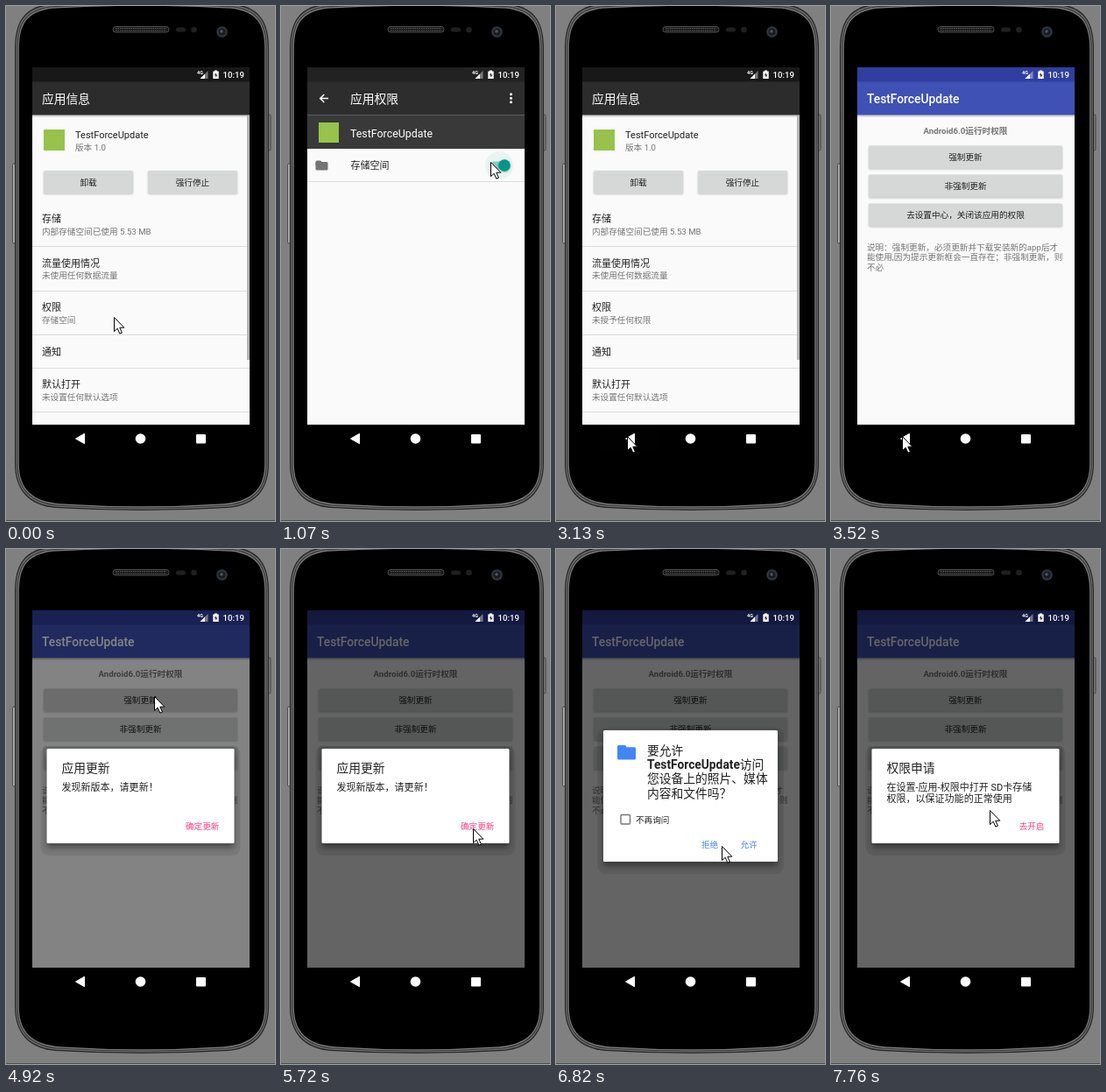
Animation, 307 px wide and 588 px high, one loop 8 s. Source, as an HTML page:

```html
<!DOCTYPE html>
<html lang="zh-CN">
<head>
<meta charset="utf-8">
<title>App permissions</title>
<style>
html, body { margin: 0; width: 100%; height: 100%; overflow: hidden; background: #808080; }
svg { display: block; width: 307px; height: 588px; }
text { font-family: Roboto, "Noto Sans CJK SC", "Noto Sans CJK", sans-serif; white-space: pre; }
</style>
</head>
<body>
<svg id="stage" viewBox="0 0 307 588" xmlns="http://www.w3.org/2000/svg"></svg>
<script>
const LOOP = 8000;
const DP = 248 / 360;                       // screen pixels per Android dp
const SMALL = 14 * DP, BODY = 16 * DP, LARGE = 18 * DP, TITLE = 20 * DP;
const INK = '#212121', GREY = '#757575', PINK = '#ff4081', BLUE = '#4285f4', LEAF = '#97c24c';
const APP = 'TestForceUpdate';
const MID = 'text-anchor="middle"', END = 'text-anchor="end"', MEDIUM = 'font-weight="500"';

// Shape helpers; text is placed by its vertical centre.
const rect = (x, y, w, h, fill, more = '') =>
  `<rect x="${x}" y="${y}" width="${w}" height="${h}" fill="${fill}" ${more}/>`;
const dot = (x, y, r, fill, more = '') =>
  `<circle cx="${x}" cy="${y}" r="${r}" fill="${fill}" ${more}/>`;
const path = (d, fill, more = '') => `<path d="${d}" fill="${fill}" ${more}/>`;
const text = (x, y, size, fill, str, more = '') =>
  `<text x="${x}" y="${y + size * 0.37}" font-size="${size}" fill="${fill}" ${more}>${str}</text>`;
const group = (id, body, more = '') => `<g id="${id}" ${more}>${body}</g>`;
const lines = (x, y, step, size, fill, list) =>
  list.map((s, i) => text(x, y + i * step, size, fill, s)).join('');
const cover = (fill, more) => rect(30, 70, 248, 408, fill, more);

const button = (x, y, w, label) =>
  rect(x, y + 1, w, 26, '#000', 'rx="1.5" opacity=".22" filter="url(#soft)"') +
  rect(x, y, w, 26, '#d6d7d7', 'rx="1.5"') +
  text(x + w / 2, y + 13, SMALL, INK, label, MID + ' ' + MEDIUM);

const page = (statusColor, barColor) =>
  cover('#fafafa') + rect(30, 124.5, 248, 3, 'url(#drop)') +
  rect(30, 86, 248, 38.5, barColor) + rect(30, 70, 248, 16.5, statusColor);

const folder = (x, y, w, h, fill) =>
  rect(x, y, w * 0.48, h / 2, fill, 'rx="1.5"') +
  rect(x, y + h * 0.14, w, h * 0.86, fill, 'rx="1.5"');

const panel = (x, y, w, h) =>
  rect(x - 7, y - 3, w + 14, h + 17, '#000', 'rx="9" opacity=".08"') +
  rect(x, y + 5, w, h, '#000', 'rx="3" opacity=".36" filter="url(#blur)"') +
  rect(x, y, w, h, '#fff', 'rx="1.5"');

function infoPage() {
  const items = [['存储', '内部存储空间已使用 5.53 MB'], ['流量使用情况', '未使用任何数据流量'],
    ['权限', '存储空间'], ['通知'], ['默认打开', '未设置任何默认选项']];
  let y = 243, list = '';
  for (const [head, sub] of items) {
    list += text(41, y, BODY, INK, head);
    if (sub) list += text(41, y + 14, SMALL, GREY, sub, head === '权限' ? 'id="permSub"' : '');
    y += sub ? 50.5 : 37.5;
    list += rect(30, Math.round(y - 19.5), 248, 1, '#dcdcdc');
  }
  return page('#181818', '#2c2c2c') +
    text(41, 105.5, TITLE, '#fff', '应用信息') +
    rect(43, 141, 24, 24, LEAF) +
    text(79, 147, BODY, INK, APP) + text(79, 161, SMALL, GREY, '版本 1.0') +
    button(43, 188, 102, '卸载') + button(162, 188, 102, '强行停止') +
    rect(30, 325, 248, 50, '#000', 'id="rowPress"') + list +
    rect(275, 125, 3, 279, '#b4b4b4');
}

function permPage() {
  return page('#222', '#2d2d2d') + rect(30, 124.5, 248, 38.5, '#393939') +
    path('M54 105.5H45M49.3 101l-4.6 4.5 4.6 4.5', 'none', 'stroke="#fff" stroke-width="1.5"') +
    text(79, 106, TITLE, '#fff', '应用权限') +
    [-1, 0, 1].map(i => dot(262.5, 105.3 + i * 4.5, 1.5, '#fff')).join('') +
    rect(43, 133, 23, 23, LEAF) + text(79, 145, LARGE, '#fff', APP) +
    folder(39.5, 176.5, 14, 11, GREY) + text(79.5, 182.3, BODY, INK, '存储空间') +
    rect(30, 200, 248, 1, '#dcdcdc') +
    dot(249, 182, 16, '#009688', 'id="halo"') +
    rect(239, 177.5, 20.5, 9, '#b9b9b9', 'id="track" rx="4.5"') +
    group('thumb', dot(0, 0.8, 7, '#000', 'opacity=".25" filter="url(#soft)"') +
      dot(0, 0, 6.8, '#ececec', 'id="knob"'));
}

function mainPage() {
  const labels = ['强制更新', '非强制更新', '去设置中心，关闭该应用的权限'];
  return page('#303f9f', '#3f51b5') +
    text(41, 105.5, TITLE, '#fff', APP, MEDIUM) +
    text(153.5, 142.5, SMALL, GREY, 'Android6.0运行时权限', MID + ' font-weight="700"') +
    labels.map((s, i) => button(43, 159.5 + i * 33, 221, s)).join('') +
    rect(43, 159.5, 221, 26, '#000', 'id="press" rx="1.5"') +
    lines(41, 275.5, 11.4, SMALL, GREY, ['说明：强制更新，必须更新并下载安装新的app后才',
      '能使用,因为提示更新框会一直存在；非强制更新，则', '不必']);
}

const dialog = (head, body, action) =>
  panel(46.5, 228, 214, 108) + text(63.5, 250, TITLE, INK, head) +
  lines(63.5, 272, 13, BODY, INK, body) +
  text(243.5, 316.5, SMALL, PINK, action, END + ' ' + MEDIUM);

const askDialog = () =>
  panel(54, 207, 199, 150) + folder(70, 224, 21, 16.5, BLUE) +
  lines(104, 230, 16.2, TITLE, INK, ['要允许', `<tspan font-weight="700">${APP}</tspan>访问`,
    '您设备上的照片、媒体', '内容和文件吗？']) +
  rect(74, 303.5, 10.5, 10.5, 'none', 'rx="1" stroke="#757575" stroke-width="1.4"') +
  text(91, 309, SMALL, INK, '不再询问') +
  rect(155, 325, 41, 24, '#000', 'id="deny" rx="1.5"') +
  text(166, 337, SMALL, BLUE, '拒绝', MEDIUM) + text(210.5, 337, SMALL, BLUE, '允许', MEDIUM);

// Outline of the phone, moved inwards by a distance.
function shell(inset) {
  const l = 10 + inset, r = 300 - inset, t = inset - 2, b = 573 - inset;
  return `M${l} 50C${l} 20 ${l + 9} ${t + 4} ${l + 38} ${t}Q155 ${t - 6} ${r - 38} ${t}` +
    `C${r - 9} ${t + 4} ${r} 20 ${r} 50V522C${r} 552 ${r - 15} ${b - 3} ${r - 46} ${b}` +
    `Q155 ${b + 6} ${l + 46} ${b}C${l + 15} ${b - 3} ${l} 552 ${l} 522Z`;
}

function phone() {
  const rings = ['#262626', '#6c6c6c', '#3a3a3a', '#7c7c7c', '#000'];
  return rect(0, 0, 307, 588, '#808080') + rect(0, 587, 307, 1, '#46554a') +
    rect(7.5, 180, 3, 91, '#a6a6a6', 'rx="1.5" stroke="#333" stroke-width=".7"') +
    rect(299, 124, 3, 41, '#777', 'rx="1.5" stroke="#333" stroke-width=".7"') +
    rings.map((c, i) => path(shell(i * 1.2), c)).join('') +
    rect(122, 23.5, 64, 6.5, '#1a1a1a', 'rx="3" stroke="#4c4c4c"') +
    path('M125 25.5H183M125 28H183', 'none', 'stroke="#595959" stroke-width="1.2" stroke-dasharray="1.5 1"') +
    rect(194, 24.5, 11, 5, '#202020', 'rx="2.5"') + dot(214.5, 27, 3.3, '#202020') +
    dot(246.5, 29.5, 6.3, '#30363d') + dot(246.5, 29.5, 4, '#171c23') + dot(246, 29, 1.7, '#4b5a69') +
    rect(48, 478, 74, 33, '#161616', 'id="navPress" rx="15"') +
    path('M79.5 494L89.5 488.3V499.7Z', '#fff', 'stroke="#fff" stroke-linejoin="round"') +
    dot(153.5, 494, 5.8, '#fff') + rect(217, 489, 11, 10.4, '#fff', 'rx="1"');
}

const status = text(218, 75.6, 5.5, '#fff', '4G', 'font-weight="700"') +
  path('M221.5 83L230.5 74V83Z', '#fff', 'opacity=".4"') + path('M221.5 83L227 77.5V83Z', '#fff') +
  rect(238, 73.5, 3, 2, '#fff') + rect(236.3, 74.5, 6.4, 8.5, '#fff') +
  path('M239.8 76l-2 3.2h1.5v2.6l2.2-3.4h-1.7z', '#222') +
  text(272, 78.3, SMALL, '#fff', '10:19', END + ' ' + MEDIUM);

const stage = document.getElementById('stage');
stage.innerHTML = `<defs>
  <clipPath id="screen">${cover('#000')}</clipPath>
  <filter id="soft" x="-20%" y="-40%" width="140%" height="180%"><feGaussianBlur stdDeviation=".8"/></filter>
  <filter id="blur" x="-20%" y="-20%" width="140%" height="140%"><feGaussianBlur stdDeviation="3"/></filter>
  <linearGradient id="drop" x2="0" y2="1"><stop stop-opacity=".25"/><stop offset="1" stop-opacity="0"/></linearGradient>
</defs>` + phone() +
  group('view', group('info', infoPage()) + group('perm', permPage()) + group('main', mainPage()) +
    cover('#000', 'id="dim"') + status +
    group('update', dialog('应用更新', ['发现新版本，请更新！'], '确定更新')) +
    group('ask', askDialog()) +
    group('request', dialog('权限申请', ['在设置-应用-权限中打开 SD卡存储', '权限，以保证功能的正常使用'], '去开启')),
    'clip-path="url(#screen)"') +
  group('cursor', path('M.5 .5V16.6L4.2 13.2L6.9 19.2L9.4 18.1L6.8 12.2H11.8Z', '#fff', 'stroke="#000"'));

const el = {};
stage.querySelectorAll('[id]').forEach(n => { el[n.id] = n; });

const BURSTS = [[140, 620, 5], [930, 1730, 7], [2320, 3250, 8], [3400, 4370, 8], [4520, 5450, 8],
  [5570, 5720, 2], [6120, 6240, 2], [6550, 7490, 7], [7640, 7760, 2]];

function hold(time) {
  const burst = BURSTS.filter(b => b[0] <= time).pop();
  if (!burst) return 0;
  const [from, to, count] = burst, step = (to - from) / (count - 1);
  return from + step * Math.min(count - 1, Math.floor((time - from) / step + 0.3));
}

const ramp = (t, from, to) => Math.min(1, Math.max(0, (t - from) / (to - from)));
const pulse = (t, peak, width) => Math.max(0, 1 - Math.abs(t - peak) / width);

// Pointer moves: start, end, destination.
const MOVES = [[800, 1063, 239, 178], [1330, 1730, 77, 487], [2200, 2453, 81, 491], [3550, 4370, 169, 168],
  [5052, 5450, 208, 310], [5450, 5720, 219, 319], [6400, 6800, 189, 339], [7490, 7760, 181, 298]];

function pointer(t) {
  let x = 123, y = 355;
  for (const [from, to, toX, toY] of MOVES) {
    const k = ramp(t, from, to);
    x += (toX - x) * k;
    y += (toY - y) * k;
  }
  return `translate(${Math.round(x)} ${Math.round(y)})`;
}

function show(node, alpha, move = '') {
  node.setAttribute('opacity', alpha);
  node.setAttribute('display', alpha > 0 ? 'inline' : 'none');
  node.setAttribute('transform', move);
}
const grow = k => `translate(153.5 282) scale(${0.9 + k * 0.1}) translate(-153.5 -282)`;

function draw(time) {
  const t = hold(time);
  const perm = ramp(t, 260, 500) - ramp(t, 2620, 2850);
  const granted = 1 - ramp(t, 1063, 1330), on = granted > 0.5;

  show(el.perm, perm, `translate(0 ${(1 - perm) ** 2 * 33})`);
  show(el.main, ramp(t, 3300, 3520));
  show(el.rowPress, 0.1 * pulse(t, 260, 200));
  show(el.press, 0.1 * pulse(t, 4653, 400));
  show(el.navPress, pulse(t, 2586, 140) + pulse(t, 3250, 140));
  el.permSub.textContent = on ? '存储空间' : '未授予任何权限';

  show(el.thumb, 1, `translate(${243.5 + granted * 11.5} 182)`);
  show(el.halo, 0.2 * pulse(t, 1197, 200));
  el.knob.setAttribute('fill', on ? '#009688' : '#ececec');
  el.track.setAttribute('fill', on ? '#8cc9c3' : '#b9b9b9');

  const opened = ramp(t, 4653, 4919), request = ramp(t, 6970, 7300);
  show(el.dim, 0.6 * ramp(t, 4700, 4975) - 0.18 * pulse(t, 6120, 100));
  show(el.update, opened - ramp(t, 6000, 6200), grow(opened));
  show(el.ask, ramp(t, 6100, 6240) - ramp(t, 6970, 7250));
  show(el.deny, 0.12 * pulse(t, 7020, 150));
  show(el.request, request, grow(request));
  show(el.cursor, 1, pointer(t));
}

const start = performance.now();
function loop() {
  draw((performance.now() - start) % LOOP);
  requestAnimationFrame(loop);
}
loop();
</script>
</body>
</html>
```
